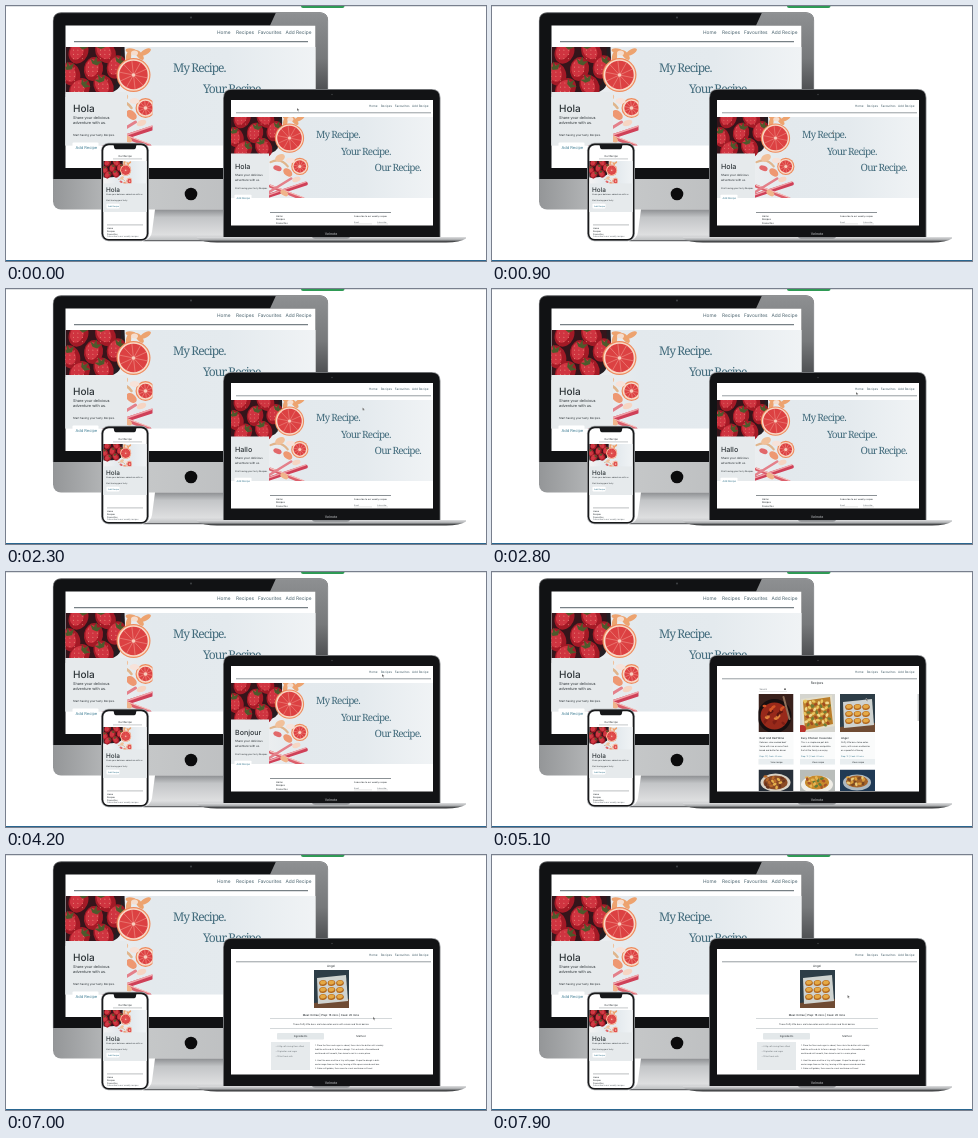
Animation, 480 px wide and 255 px high, one loop 8000 ms. Source, as an HTML page:

```html
<!DOCTYPE html>
<html lang="en">
<head>
<meta charset="utf-8">
<title>Recipe site on three devices</title>
<style>
html, body { margin: 0; width: 100%; height: 100%; overflow: hidden; background: #fff; }
svg { display: block; }
#stage { width: 100vw; height: 100vh; }
text { font-family: Inter, "Open Sans", sans-serif; fill: #2b3236; text-rendering: geometricPrecision; white-space: pre; }
.nav { fill: #48616c; }
.serif { font-family: "Noto Serif", serif; fill: #426b7c; }
.soft { fill: #666d72; }
.blue { fill: #3d7c93; }
.mid { text-anchor: middle; }
.hello { font-weight: 500; }
</style>
</head>
<body>
<svg id="stage" viewBox="0 0 480 255"></svg>
<script>
const LOOP = 8000, STEP = 100;

// Drawing helpers
const rect = (x, y, w, h, fill, r = 0, more = '') =>
  `<rect x="${x}" y="${y}" width="${w}" height="${h}" rx="${r}" fill="${fill}" ${more}/>`;
const oval = (x, y, rx, ry, fill, turn = 0) =>
  `<ellipse cx="${x}" cy="${y}" rx="${rx}" ry="${ry}" fill="${fill}" transform="rotate(${turn} ${x} ${y})"/>`;
const path = (d, fill, more = '') => `<path d="${d}" fill="${fill}" ${more}/>`;
const line = (d, color, width) =>
  path(d, 'none', `stroke="${color}" stroke-width="${width}" stroke-linecap="round"`);
const text = (x, y, size, str, cls = '', more = '') =>
  `<text x="${x}" y="${y}" font-size="${size}" class="${cls}" ${more}>${str}</text>`;
const rows = (x, y, size, gap, list, cls) =>
  list.map((s, i) => text(x, y + i * gap, size, s, cls)).join('');
const crop = (x, y, w, h, box, body) =>
  `<svg x="${x}" y="${y}" width="${w}" height="${h}" viewBox="${box}" preserveAspectRatio="xMinYMin slice">${body}</svg>`;
const gradient = (id, dir, stops) =>
  `<linearGradient id="${id}" ${dir}>` +
  stops.map(([at, c]) => `<stop offset="${at}" stop-color="${c}"/>`).join('') + '</linearGradient>';
const down = 'x1="0" y1="0" x2="0" y2="1"';

// Fruit picture, 87 x 99 units
function citrus(x, y, r) {
  let out = oval(x, y, r, r, '#ee8a5c') + oval(x, y, r - 1.2, r - 1.2, '#f9d9c6') +
    oval(x, y, r - 2.8, r - 2.8, '#dc4142');
  for (let i = 0; i < 10; i++) {
    const a = i * Math.PI / 5 + 0.2;
    out += line(`M${x} ${y}l${(r - 3) * Math.cos(a)} ${(r - 3) * Math.sin(a)}`, '#f0968c', 0.6);
  }
  return out + oval(x, y, 1.8, 1.8, '#f8cdbd');
}
function berry([x, y, turn]) {
  let out = oval(x, y, 9.5, 12, '#a31a26', turn) + oval(x - 1.5, y - 1, 6.5, 9, '#cf3440', turn);
  for (let i = 0; i < 12; i++)
    out += oval(x - 5 + i % 3 * 4.4, y - 6 + Math.floor(i / 3) * 4.2, 0.4, 0.6, '#ea9382');
  return out + path(`M${x - 5} ${y - 10}l4 2 2-5 1 5 5-1-4 5-5-1z`, '#4d5a2c', `transform="rotate(${turn} ${x} ${y})"`);
}
const berries = [[13, 5, 25], [40, 5, -35], [5, 27, -20], [51, 20, 20], [28, 22, 10], [14, 42, 40], [38, 39, -30]];
const fruit = path('M0 0H59Q61 22 54 40 47 51 0 50z', '#241d22') + path('M0 0H55Q57 22 50 37 43 47 0 47z', '#35151b') +
  berries.map(berry).join('') +
  [[66, 4, 10], [74, 8, 50], [63, 10, 100], [80, 5, -30]].map(([x, y, a]) => oval(x, y, 6, 2.6, '#eda36f', a)).join('') +
  oval(69, 6, 3.5, 2.5, '#f6ddcd') +
  line('M46 56q12-6 20 5', '#e0b58c', 2.5) + oval(57, 51, 6, 4, '#f1c09a', -25) + oval(54, 63, 5, 3, '#e2686a', 20) +
  citrus(68, 28, 17) + citrus(80, 61, 10) +
  oval(69, 54, 5, 3, '#f7e2d9') + oval(66, 68, 6, 4, '#ee9872', 40) + oval(76, 76, 5, 3, '#f6d5c3', -20) +
  line('M38 97L87 81', '#cf4058', 4.5) + line('M38 96L87 79', '#f0a3a8', 1.5) +
  line('M46 84L84 99', '#dc5f6c', 4) + line('M46 83L84 97', '#f4bfbc', 1.3) +
  line('M44 91L70 75', '#e4808a', 3) + oval(62, 92, 5, 3, '#f0b48b', 30);

const nav = (xs, y, size) =>
  ['Home', 'Recipes', 'Favourites', 'Add Recipe'].map((s, i) => text(xs[i], y, size, s, 'nav')).join('');
const slogan = (x, y, size, str) =>
  text(x, y, size, str, 'serif', `letter-spacing="${-size * 0.078}"`);

function desktop() {
  return rect(47, 6.5, 275, 197, 'url(#chin)', 8) +
    path('M47 173V15q0-8.5 8.5-8.5H313.500q8.500 0 8.500 8.500V173z', '#111214') +
    path('M270 6.500H313.500q8.500 0 8.500 8.500V120H309.500V19.500H264z', 'url(#gloss)') +
    path('M47.200 173V15q0-8.300 8.300-8.300H313.500q8.300 0 8.300 8.300V90', 'none', 'stroke="#a5a7a9" stroke-width=".5"') +
    oval(185, 11.5, 0.9, 0.9, '#45484b') +
    path('M149 203.500H217V235H137q8-2 9-9z', 'url(#stand)') + rect(137, 234, 82, 1.2, '#66686b', 0.6) +
    oval(185, 188, 6.3, 6.3, '#0b0b0c') +
    rect(59.5, 19.5, 250, 142.5, '#fff') + nav([211, 230, 252, 279.5], 28.2, 4.8) +
    rect(68, 35.2, 234, 1, '#566168') +
    rect(59.5, 41, 250, 98.5, 'url(#hero)') + crop(59.5, 41, 87, 98.5, '0 0 87 98.5', fruit) +
    slogan(167, 66, 12, 'My Recipe.') + slogan(197, 87, 12, 'Your Recipe.') +
    rect(59.5, 86, 61.5, 53.5, '#e6eaec') + text(67, 105.5, 10, 'Hola', 'hello') +
    rows(67, 112.6, 3.8, 5.7, ['Share your delicious', 'adventure with us.']) +
    text(67, 130, 2.8, 'Start having your tasty Recipes.') +
    rect(66.5, 136.5, 26, 9, '#fff', 1) + text(69.5, 142.7, 4, 'Add Recipe', 'blue');
}

function phone() {
  return rect(95, 136.8, 48, 98.4, '#a9abae', 7.5) + rect(95.7, 137.4, 46.6, 97.2, '#17181a', 7) +
    rect(97.3, 139.2, 43.4, 93.8, '#fff', 5.5) +
    path('M106 138.5h26q-2 0-2 2.2 0 2.6-3 2.6h-16q-3 0-3-2.6 0-2.2-2-2.2z', '#17181a') +
    text(119, 150.6, 2.6, 'Our Recipe', 'mid') + rect(107, 152.7, 29, 0.5, '#8b9296') +
    rect(97.3, 155, 43.4, 51, 'url(#hero)') + crop(97.3, 155, 28, 23, '0 0 85 70', fruit) +
    rect(97.3, 177.5, 43.4, 28.5, '#e6eaec') + text(100, 185.6, 6.4, 'Hola', 'hello') +
    text(100, 189, 2, 'Share your delicious adventure with us') +
    text(100, 195.2, 2, 'Start having your tasty') +
    rect(100.5, 197.8, 13, 4.6, '#fff', 0.8) + text(102, 201, 2, 'Add Recipe', 'blue') +
    rect(101, 218.7, 36, 0.5, '#777e82') + rows(101, 223, 2.2, 2.8, ['Home', 'Recipes', 'Favourites']) +
    text(101, 231.4, 2.1, 'Subscribe to our weekly recipes', 'soft');
}

const home = rect(225, 111, 202, 81, 'url(#hero)') + crop(225, 111, 83, 81, '0 3.5 96.5 94.2', fruit) +
  slogan(310, 132, 10, 'My Recipe.') + slogan(335, 149, 10, 'Your Recipe.') + slogan(368.5, 165, 10, 'Our Recipe.') +
  rect(225, 147.5, 38, 44.5, '#e6eaec') + text(229, 163, 7.1, 'Hola', 'hello', 'id="greeting"') +
  rows(229, 170.2, 2.9, 4.9, ['Share your delicious', 'adventure with us.']) +
  text(229, 183.4, 2.2, 'Start having your tasty Recipes.') +
  rect(228.5, 188.7, 17, 5.8, '#fff', 0.7) + text(230.5, 192.8, 2.5, 'Add Recipe', 'blue') +
  rect(264, 206, 121, 0.7, '#596267') + rows(270, 210.8, 2.4, 3.4, ['Home', 'Recipes', 'Favourites']) +
  text(348, 210.8, 2.2, 'Subscribe to our weekly recipes') + text(348, 217, 2, 'Email', 'soft') +
  text(371, 217, 2, 'Subscribe', 'soft') + rect(348, 217.8, 18, 0.3, '#aaa') + rect(371, 217.8, 11, 0.3, '#aaa');

// Dish pictures, 35 x 38 units
const back = color => rect(0, 0, 35, 38, color);
const scatter = (n, colors, x, y, w, h) => Array.from({ length: n }, (_, i) =>
  oval(x + i * 7.3 % w, y + i * 4.7 % h, 2, 1.3, colors[i % colors.length], i * 40)).join('');
const buns = Array.from({ length: 9 }, (_, i) => {
  const x = 9 + i % 3 * 8.5, y = 13 + Math.floor(i / 3) * 7;
  return oval(x, y, 3.9, 3, '#b3691f', -8) + oval(x, y - 0.5, 2.9, 1.9, '#e5a945', -8);
}).join('');
const dishes = [
  back('#3a211c') + oval(16, 22, 17, 17, '#170f10') + oval(16, 22, 14, 13.5, '#98291a') +
    scatter(22, ['#d45526', '#5d1510', '#e0813a', '#7d1d14'], 6, 12, 20, 18) + line('M25 3L31 25', '#91705a', 2),
  back('#d5d5cf') + path('M1 5L32 1 35 32 3 38z', '#e4dfcc') + path('M3 7L30 3 33 30 5 36z', '#bb7e2a') +
    scatter(50, ['#e8c65f', '#6f7d35', '#a24c20', '#f0d98e'], 5, 7, 25, 25) + oval(2, 35, 4, 4, '#b8332c'),
  back('#2d3d47') + path('M0 33L35 29V38H0z', '#6f4b33') + path('M3 8L32 5 34 31 4 34z', '#cfd3d0') + buns,
  back('#28303a') + oval(17, 13, 15, 9, '#d9d3c7') + oval(17, 13, 12, 7, '#8a4a25') +
    scatter(16, ['#ba6a2b', '#e4b04c', '#6a351e'], 7, 7, 20, 11),
  back('#b9bdba') + oval(17, 15, 16, 9, '#f0eee7') + oval(17, 13, 12, 7, '#c88a2c') +
    scatter(16, ['#e6b552', '#647c36', '#a8532a'], 7, 8, 20, 10),
  back('#203a55') + oval(17, 13, 14, 8, '#aeb9c0') + oval(17, 12, 11, 6, '#a5642a') +
    scatter(14, ['#d99c3b', '#7a4823', '#e9c979'], 8, 8, 18, 9)
];
const dish = (i, x, y, h = 38) => crop(x, y, 35, h, `0 0 35 ${h}`, dishes[i]);

const cards = [
  [266.5, 'Beef And Red Wine', ['Delicious slow cooked beef', 'Serve with rice or some fresh', 'bread and butter for dinner']],
  [308, 'Easy Chicken Casserole', ['This is a simple one pot dish', 'made with chicken and potato', 'that all the family can enjoy']],
  [348, 'Angel', ['Fluffy little buns to be eaten', 'warm, with cream and berries', 'or a spoonful of honey']]
];
const list = text(325, 112.4, 3.4, 'Recipes', 'mid') +
  text(267.5, 118.2, 2.3, 'Search', 'soft') + rect(267, 119.2, 28, 0.3, '#bbb') + oval(293, 117.2, 0.9, 0.9, '#555') +
  cards.map(([x, name, body], i) =>
    rect(x, 122, 35, 71, '#fafbfb') + dish(i, x, 122) + text(x + 0.9, 167.2, 2.7, name, 'hello') +
    rows(x + 0.9, 171.4, 2.1, 3.6, body) + text(x + 0.9, 185.4, 2, 'Prep: 15 | Cook: 20 mins', 'blue') +
    rect(x, 187, 35, 5.4, '#e9eef0') + text(x + 18, 190.6, 2.2, 'View recipe', 'mid') +
    dish(i + 3, x, 197.5, 21.5)).join('') +
  rect(425.7, 122, 0.9, 27, '#a9aeb1');

const method = ['1. Place the flour and sugar in a bowl, then rub in the butter until crumbly',
  'Add the milk and stir to form a dough. Turn out onto a floured board',
  'and knead until smooth, then leave to rest in a warm place.',
  '', '2. Heat the oven and line a tray with paper. Shape the dough in balls',
  'and arrange them on the tray, leaving a little space around each bun.',
  '3. Bake until golden, then move to a rack and leave until cool.'];
const detail = text(325, 112.4, 3, 'Angel', 'mid') + dish(2, 308, 115) +
  text(325, 160.5, 2.7, 'Meal: Entree | Prep: 15 mins | Cook: 20 mins', 'mid hello') + rect(264, 163, 122, 0.5, '#a8b0b4') +
  text(325, 169.7, 2.2, 'These fluffy little buns are to be eaten warm with cream and fresh berries', 'mid') +
  rect(264, 173.2, 122, 0.5, '#a8b0b4') +
  rect(271, 178, 47, 6.5, '#e3e8ea', 1) + text(294.5, 182.3, 2.6, 'Ingredients', 'mid') + text(355, 182.3, 2.6, 'Method', 'mid') +
  rect(265, 187, 39, 28, '#e6eaec') +
  rows(269.5, 192, 2, 5, ['• 225g self raising flour sifted', '• 50g butter and sugar', '• 150ml fresh milk'], 'soft') +
  rows(309, 191, 2, 3.8, method);

function laptop() {
  return path('M217 231V92q0-9 9-9H425.500q9 0 9 9V231z', '#8f9194') +
    path('M217.800 231V92q0-8.200 8.200-8.200H425.500q8.200 0 8.200 8.200V231z', '#121315') +
    oval(326, 88.5, 0.7, 0.7, '#45484b') +
    text(325, 229.4, 3.5, 'Velnote', 'mid', 'style="fill:#c9cbcd"') +
    path('M191 231H460V232.500q-6 4-20 4H211q-14 0-20-4z', 'url(#base)') +
    path('M306 231h38q-.5 1.800-3 1.800h-32q-2.500 0-3-1.800z', '#8f9194') +
    rect(225, 94, 202, 125.5, '#fff') + nav([363, 374.7, 388.7, 406], 101.2, 3.05) +
    rect(230, 106.5, 195, 0.7, '#6b757a') +
    crop(225, 94, 202, 125.5, '225 94 202 125.5', `<g id="home">${home}</g><g id="list">${list}</g><g id="detail">${detail}</g>`) +
    path('M0 0L0 3 .8 2.400 1.400 3.600 1.900 3.300 1.300 2.200 2.300 2.100z', '#555', 'id="pointer" stroke="#fff" stroke-width=".25"');
}

const stage = document.getElementById('stage');
stage.innerHTML = '<defs>' +
  gradient('hero', '', [[0, '#f4f3f3'], [0.35, '#e3e9ed'], [0.65, '#e4eaee'], [1, '#f0f3f5']]) +
  gradient('chin', '', [[0, '#949698'], [0.3, '#c6c8c9'], [1, '#b6b8ba']]) +
  gradient('gloss', down, [[0, '#8e9092'], [0.4, '#77797b'], [1, '#222326']]) +
  gradient('stand', down, [[0, '#8d8f92'], [0.25, '#c3c5c7'], [0.8, '#dedfe0'], [1, '#b9bbbd']]) +
  gradient('base', down, [[0, '#dfe0e1'], [0.5, '#aaacae'], [0.8, '#4a4c4e'], [1, '#2b2c2e']]) + '</defs>' +
  rect(0, 0, 480, 255, '#fff') + rect(0, 0, 480, 0.9, '#dcdfe1') + rect(295, -5, 43.5, 7, '#2f9a55', 2) +
  rect(0, 254, 480, 1, '#2a6690') + desktop() + laptop() + phone();

// Time tables
const greetings = [[0, 'Hola'], [1500, 'Hallo'], [3000, 'Bonjour']];
const pages = [[0, 'home'], [4600, 'list'], [6600, 'detail']];
const moves = [[0, 291, 102], [800, 340, 125], [1800, 346, 140], [2700, 364, 103], [3300, 364, 102], [3900, 376, 102],
  [4700, 376, 102], [5500, 372, 150], [6000, 369, 189], [6700, 369, 189], [7200, 366, 147], [7400, 355.5, 140], [8000, 355.5, 140]];

const $ = id => document.getElementById(id);
const pick = (table, t) => table.filter(([at]) => at <= t).pop()[1];

function place(t) {
  const i = moves.findIndex(([at]) => at > t);
  const [t0, x0, y0] = moves[i - 1], [t1, x1, y1] = moves[i];
  const k = (t - t0) / (t1 - t0), e = k * k * (3 - 2 * k);
  return [x0 + (x1 - x0) * e, y0 + (y1 - y0) * e];
}

function draw(now) {
  const t = Math.floor(now % LOOP / STEP) * STEP;
  const page = pick(pages, t);
  for (const [, id] of pages) $(id).style.display = id === page ? '' : 'none';
  $('greeting').textContent = pick(greetings, t);
  $('pointer').setAttribute('transform', `translate(${place(t)})`);
}

const start = performance.now();
function tick() {
  draw(performance.now() - start);
  requestAnimationFrame(tick);
}
tick();
</script>
</body>
</html>
```
